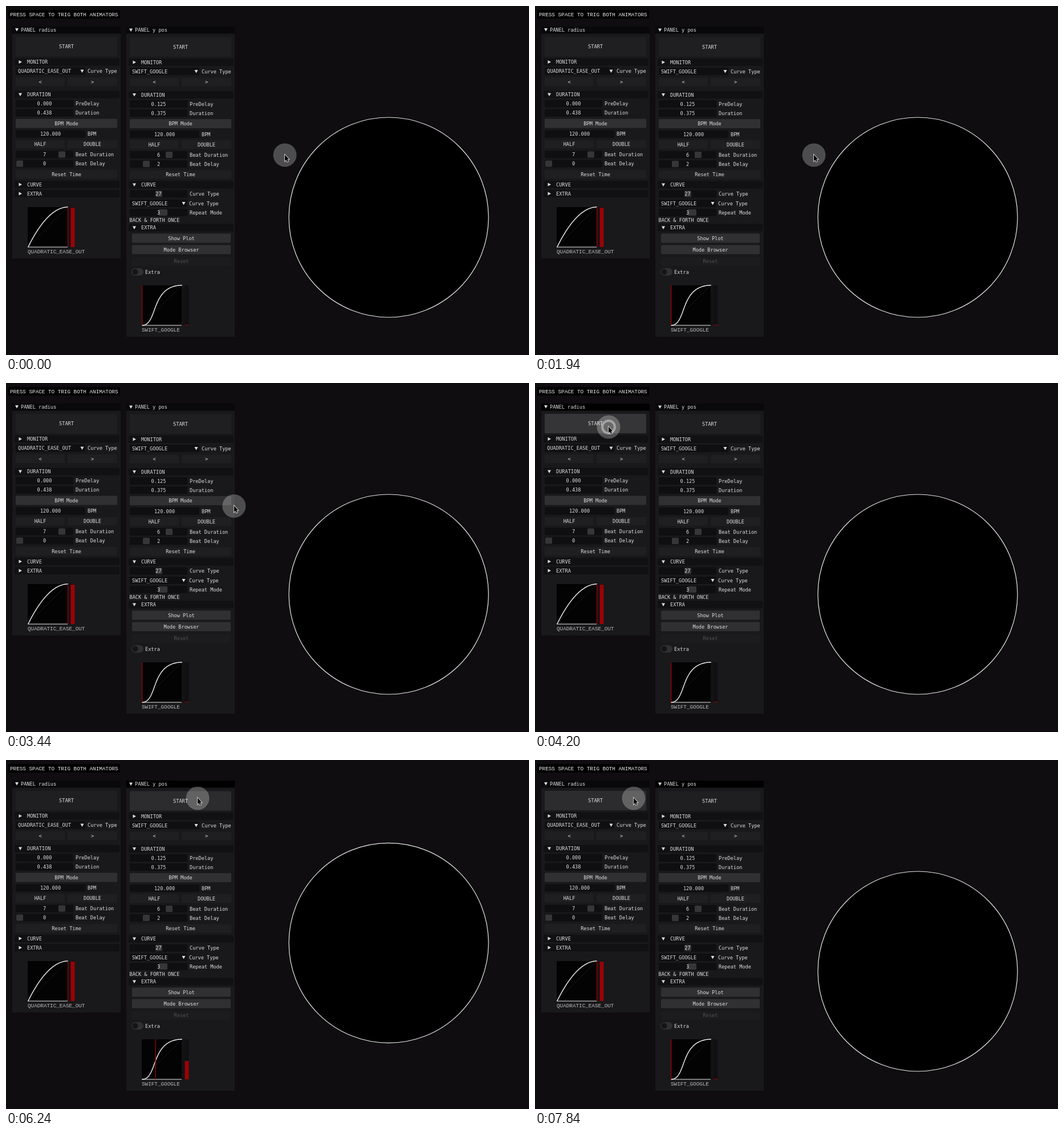
These frames come from a looping animation (917x611 px, 8 s). An HTML page with a canvas:

```html
<!DOCTYPE html>
<html lang="en">
<head>
<meta charset="utf-8">
<title>Animator panels</title>
<style>
html, body { margin: 0; width: 100%; height: 100%; overflow: hidden; background: #0f0d10; }
canvas { display: block; width: 917px; height: 611px; }
</style>
</head>
<body>
<canvas id="stage" width="917" height="611"></canvas>
<script>
const ctx = document.getElementById('stage').getContext('2d');
const LOOP = 8000;
const UI_FONT = '8.6px "DejaVu Sans Mono", monospace';
const PLAIN_FONT = '9.3px "Liberation Mono", monospace';
const C = {
  bg: '#0f0d10', panel: '#19181a', title: '#09080a', focused: '#000', field: '#0f0e10',
  header: '#111012', button: '#1f1e20', hover: '#2c2b2d', active: '#353436',
  on: '#302f31', grab: '#363537', text: '#dededf', dim: '#515052', red: '#990308'
};

// Times at which the animators are triggered and the mouse is pressed
const RADIUS_TRIGGERS = [1035, 2467, 4292];
const Y_TRIGGERS = [1035, 2467, 5990, 6823];
const PRESSES = [500, 4040, 5800, 6640];
const RADIUS_MS = 438, Y_DELAY = 125, Y_MS = 375;

const clamp = v => Math.max(0, Math.min(1, v));
const mix = (a, b, p) => a + (b - a) * p;
const smooth = p => p * p * (3 - 2 * p);
const quadOut = p => p * (2 - p);
const bezier = (a, b, c, d, p) => {
  const q = 1 - p;
  return a * q * q * q + 3 * b * q * q * p + 3 * c * q * p * p + d * p * p * p;
};

function swift(x) {
  let lo = 0, hi = 1;
  for (let i = 0; i < 20; i++) {
    const mid = (lo + hi) / 2;
    if (bezier(0, 0.4, 0.2, 1, mid) < x) lo = mid; else hi = mid;
  }
  return bezier(0, 0, 1, 1, lo);
}

const since = (times, t) => t - Math.max(-LOOP, ...times.filter(s => s <= t));
const radiusProgress = t => clamp(since(RADIUS_TRIGGERS, t) / RADIUS_MS);
function yProgress(t) {
  const q = (since(Y_TRIGGERS, t) - Y_DELAY) / Y_MS;
  return clamp(q < 1 ? q : 2 - q);
}

function mouseAt(t) {
  if (t < 5250) {
    const p = 1 - Math.pow(1 - clamp((t - 3338) / 560), 1.4);
    return { x: mix(489, 129, p), y: mix(261, 77, p) };
  }
  if (t < 7380) {
    const p = smooth(clamp((t - 5250) / 540));
    return { x: bezier(129, 300, 490, 336, p), y: bezier(77, 30, 60, 67, p) };
  }
  return { x: mix(336, 173, quadOut(clamp((t - 7380) / 450))), y: 67 };
}

function rect(x, y, w, h, fill, round = 1.5) {
  ctx.fillStyle = fill;
  ctx.beginPath();
  ctx.roundRect(x, y, w, h, round);
  ctx.fill();
}

function text(str, x, y, align = 'left', color = C.text, font = UI_FONT) {
  ctx.font = font;
  ctx.textAlign = align;
  ctx.fillStyle = color;
  ctx.fillText(str, x, y + 3);
}

function arrow(x, y, open) {
  ctx.fillStyle = C.text;
  ctx.beginPath();
  if (open) {
    ctx.moveTo(x - 3, y - 2.5); ctx.lineTo(x + 3, y - 2.5); ctx.lineTo(x, y + 3);
  } else {
    ctx.moveTo(x - 2.5, y - 3); ctx.lineTo(x + 3, y); ctx.lineTo(x - 2.5, y + 3);
  }
  ctx.fill();
}

function button(str, x, y, w, h = 15, fill = C.button, color = C.text) {
  rect(x, y - h / 2, w, h, fill);
  text(str, x + w / 2, y, 'center', color);
}

function header(str, x, y, open) {
  rect(x, y - 6.5, 184, 13, C.header);
  arrow(x + 10, y, open);
  text(str, x + 22, y);
}

function field(value, label, x, y, w = 101, grabX, grabW = 12) {
  rect(x, y - 6.5, w, 13, C.field);
  if (grabX !== undefined) rect(grabX, y - 5.5, grabW, 11, C.grab);
  text(value, x + w / 2, y, 'center');
  text(label, x + w + 4, y);
}

function combo(value, x, y, w) {
  rect(x, y - 6.5, w, 13, C.field);
  text(value, x + 4, y);
  arrow(x + w - 5.5, y, true);
  text('Curve Type', x + w + 4, y);
}

function plot(x, y, curve, progress, name) {
  const size = 70;
  rect(x, y, size, size, '#030304', 0);
  rect(x + size, y, 5, size, '#131214', 0);
  ctx.lineWidth = 1;
  ctx.strokeStyle = '#171618';
  ctx.beginPath();
  ctx.moveTo(x, y + size);
  ctx.lineTo(x + size, y);
  ctx.stroke();
  ctx.fillStyle = '#e8e8e8';
  ctx.fillRect(x, y + size - 0.5, size, 1);
  ctx.strokeStyle = '#f4f4f4';
  ctx.lineWidth = 1.4;
  ctx.beginPath();
  for (let i = 0; i <= size; i++) ctx.lineTo(x + i + 0.7, y + size * (1 - curve(i / size)));
  ctx.stroke();
  ctx.fillStyle = C.red;
  ctx.fillRect(x + size * progress, y, 1.3, size);
  rect(x + 75, y, 7.5, size, '#100f11', 0);
  const h = Math.max(1, (size - 1) * curve(progress));
  rect(x + 75.5, y + size - h, 7, h, C.red, 0);
  text(name, x, y + 78, 'left', '#bcbcbe', PLAIN_FONT);
}

function panel(o) {
  const x = o.x;
  const row = y => y + o.dy;
  rect(x, 36, 190, o.bottom - 36, C.panel, 0);
  rect(x, 36, 190, 12.5, o.focused ? C.focused : C.title, 0);
  arrow(x + 8, row(41.5), true);
  text(o.title, x + 15, row(41.5));
  button('START', x + 6, row(71), 178, 34, o.start);
  header('MONITOR', x + 4, row(98), false);
  combo(o.curve, x + 6, row(114), 122);
  button('<', x + 6, row(132.5), 86);
  button('>', x + 97, row(132.5), 87);
  header('DURATION', x + 4, row(155), true);
  field(o.delay, 'PreDelay', x + 6, row(171));
  field(o.duration, 'Duration', x + 6, row(187));
  button('BPM Mode', x + 6, row(205.5), 178, 16, C.on);
  field('120.000', 'BPM', x + 6, row(224), 122);
  button('HALF', x + 6, row(242), 86);
  button('DOUBLE', x + 97, row(242), 87);
  field(o.beats[0], 'Beat Duration', x + 6, row(260), 101, x + o.grabs[0]);
  field(o.beats[1], 'Beat Delay', x + 6, row(276), 101, x + o.grabs[1]);
  button('Reset Time', x + 6, row(294.5), 178);
}

function startColor(x, m, t) {
  const over = m.x >= x + 6 && m.x <= x + 184 && m.y >= 54 && m.y <= 88;
  if (!over) return C.button;
  return since(PRESSES, t) < 190 ? C.active : C.hover;
}

function pointer(m, t) {
  ctx.fillStyle = 'rgba(255,255,255,.26)';
  ctx.beginPath();
  ctx.arc(m.x, m.y, 20.5, 0, Math.PI * 2);
  ctx.fill();

  const p = since(PRESSES, t) / 400;
  if (p < 1) {
    ctx.strokeStyle = `rgba(255,255,255,${0.65 * (1 - p)})`;
    ctx.lineWidth = 4;
    ctx.beginPath();
    ctx.arc(m.x, m.y, 17 * quadOut(p), 0, Math.PI * 2);
    ctx.stroke();
  }

  ctx.save();
  ctx.translate(m.x, m.y - 0.5);
  ctx.beginPath();
  [[0, 0], [0, 11], [2.4, 8.8], [4, 12.4], [5.7, 11.6], [4.2, 8.1], [7.2, 7.8]]
    .forEach(([x, y]) => ctx.lineTo(x, y));
  ctx.closePath();
  ctx.lineWidth = 1.8;
  ctx.strokeStyle = '#d8d8d8';
  ctx.stroke();
  ctx.fillStyle = '#000';
  ctx.fill();
  ctx.restore();
}

function draw(t) {
  const m = mouseAt(t);
  const rp = radiusProgress(t), yp = yProgress(t);
  rect(0, 0, 917, 611, C.bg, 0);

  const radius = 175 * quadOut(rp);
  ctx.beginPath();
  ctx.arc(671, 370 - 107 * swift(yp), radius, 0, Math.PI * 2);
  ctx.fillStyle = '#000';
  ctx.fill();
  ctx.strokeStyle = '#e6e6e6';
  ctx.lineWidth = 1.2;
  ctx.stroke();

  rect(4, 7, 196, 15, '#000', 0);
  text('PRESS SPACE TO TRIG BOTH ANIMATORS', 7, 14.5, 'left', '#ececec', PLAIN_FONT);

  panel({
    x: 11, dy: 0, bottom: 442, title: 'PANEL radius', curve: 'QUADRATIC_EASE_OUT',
    delay: '0.000', duration: '0.438', beats: ['7', '0'], grabs: [81, 7],
    focused: t >= 4040 && t < 5800, start: startColor(11, m, t)
  });
  header('CURVE', 15, 312.5, false);
  header('EXTRA', 15, 328.5, false);
  plot(38, 352, quadOut, rp, 'QUADRATIC_EASE_OUT');

  panel({
    x: 211, dy: 0.5, bottom: 579, title: 'PANEL y pos', curve: 'SWIFT_GOOGLE',
    delay: '0.125', duration: '0.375', beats: ['6', '2'], grabs: [69, 29],
    focused: t >= 5800, start: startColor(211, m, t)
  });
  header('CURVE', 215, 313, true);
  field('27', 'Curve Type', 217, 329, 101, 262);
  combo('SWIFT_GOOGLE', 217, 345.5, 100);
  field('3', 'Repeat Mode', 217, 361.5, 101, 267, 16);
  text('BACK & FORTH ONCE', 216.5, 375);
  header('EXTRA', 215, 388, true);
  button('Show Plot', 221, 406.5, 173, 16, C.on);
  button('Mode Browser', 221, 426.5, 173, 16, C.on);
  button('Reset', 221, 447, 173, 15, '#1c1b1d', C.dim);
  rect(220, 459, 21, 13, C.on, 6.5);
  ctx.fillStyle = '#151416';
  ctx.beginPath();
  ctx.arc(226.5, 465.5, 5, 0, Math.PI * 2);
  ctx.fill();
  text('Extra', 244, 465.5);
  plot(238, 489, swift, yp, 'SWIFT_GOOGLE');

  pointer(m, t);
}

const begin = performance.now();
function tick() {
  draw((performance.now() - begin) % LOOP);
  requestAnimationFrame(tick);
}
tick();
</script>
</body>
</html>
```
